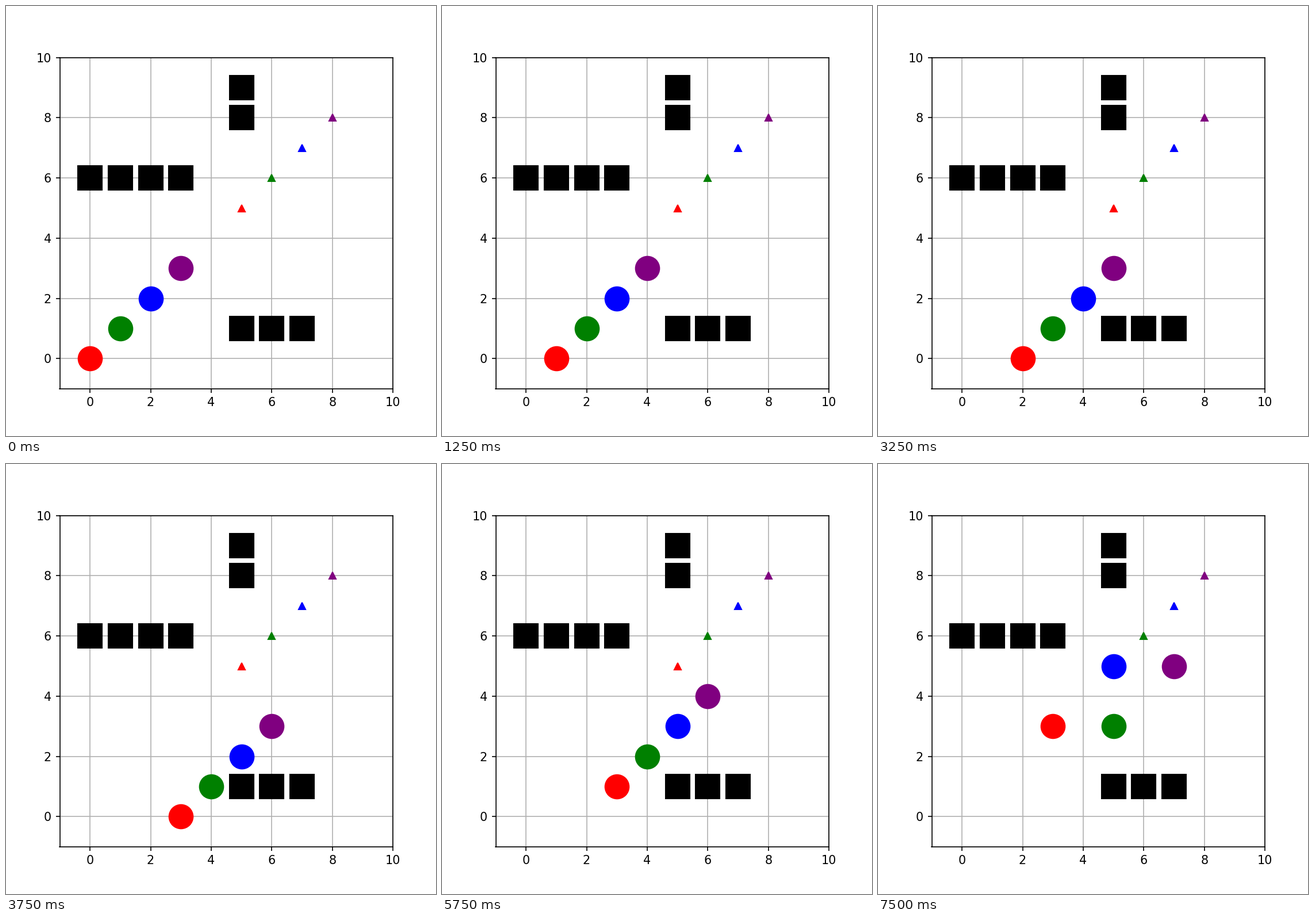
A matplotlib script for the animation above (8 s loop, 748 by 748 pixels).

```python
import matplotlib.pyplot as plt
from matplotlib.animation import FuncAnimation

INTERVAL = 250
FRAMES = 32
STEP_FRAMES = 5  # frames spent on each grid cell

MOVES = {"R": (1, 0), "U": (0, 1)}

# colour, start cell, goal cell, moves
AGENTS = [
    ("red", (0, 0), (5, 5), "RRRUUU"),
    ("green", (1, 1), (6, 6), "RRRURU"),
    ("blue", (2, 2), (7, 7), "RRRUUU"),
    ("purple", (3, 3), (8, 8), "RRRURU"),
]
OBSTACLES = [(x, 6) for x in range(4)] + [(5, 8), (5, 9)] + [(x, 1) for x in (5, 6, 7)]


def position(start, moves, step):
    x, y = start
    for move in moves[:step]:
        dx, dy = MOVES[move]
        x, y = x + dx, y + dy
    return x, y


fig, ax = plt.subplots(figsize=(5, 5), dpi=149.6)
ax.set_xlim(-1, 10)
ax.set_ylim(-1, 10)
ax.set_xticks(range(0, 11, 2))
ax.set_yticks(range(0, 11, 2))
ax.grid(True)

for x, y in OBSTACLES:
    ax.plot(x, y, "s", color="black", markersize=20)
for color, _, goal, _ in AGENTS:
    ax.plot(*goal, "^", color=color, markersize=6)
discs = [ax.plot(*start, "o", color=color, markersize=20)[0]
         for color, start, _, _ in AGENTS]


def update(frame):
    step = frame // STEP_FRAMES
    for disc, (_, start, _, moves) in zip(discs, AGENTS):
        x, y = position(start, moves, step)
        disc.set_data([x], [y])
    return discs


anim = FuncAnimation(fig, update, frames=FRAMES, interval=INTERVAL,
                     repeat=True, repeat_delay=0)
plt.show()
```
